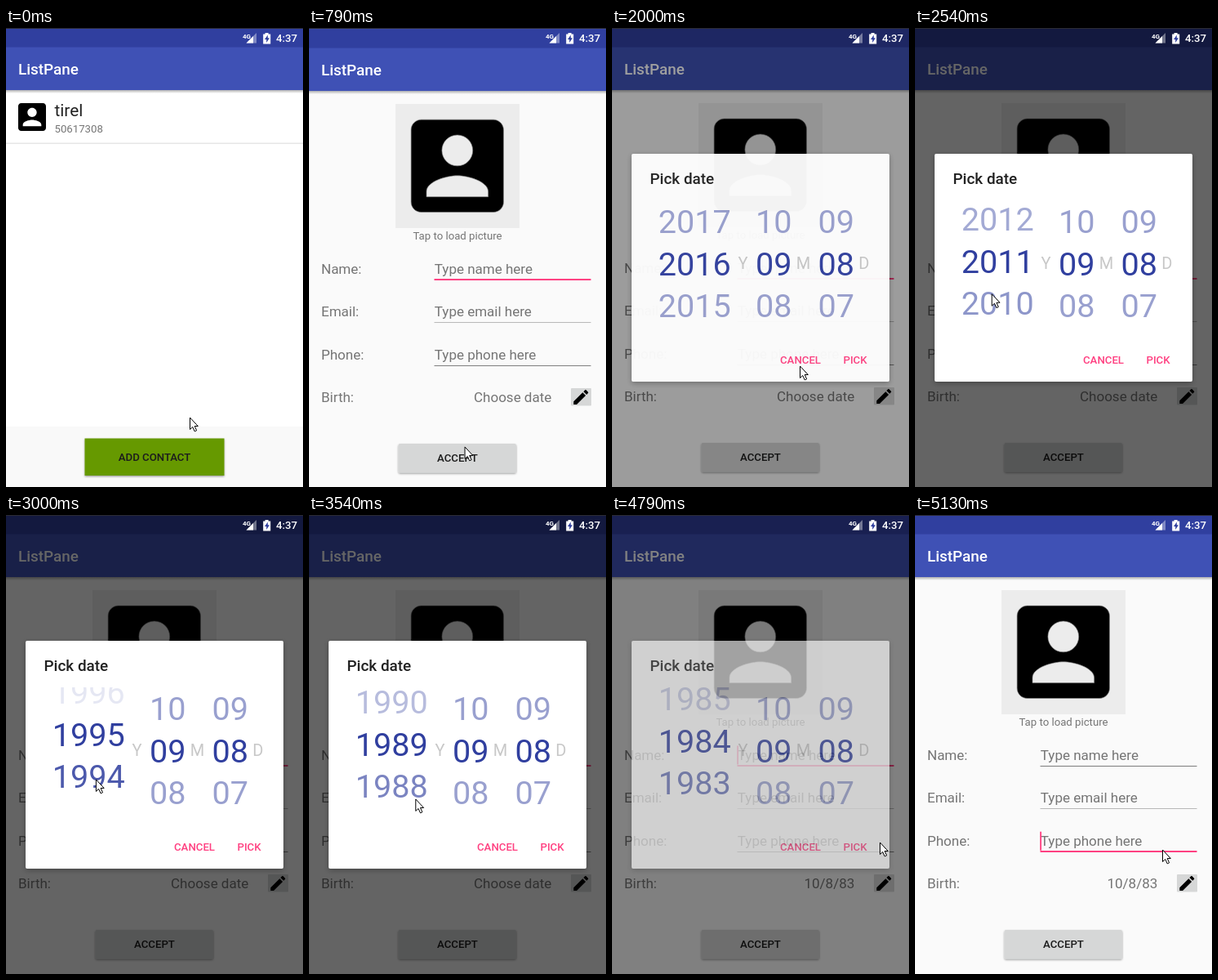
Write an HTML page that moves like this. It is 364x562 px and loops after 5180 ms.

```html
<!DOCTYPE html>
<html lang="en">
<head>
<meta charset="utf-8">
<title>Contact form</title>
<style>
  html, body { margin: 0; width: 100%; height: 100%; overflow: hidden; background: #fafafa; }
  svg { display: block; width: 100%; height: 100%; }
  text { font-family: Roboto, "Liberation Sans", sans-serif; font-size: 17px; fill: #757575; }
  .title { font-size: 18.9px; font-weight: 500; fill: #fff; }
  .small { font-size: 13.2px; }
  .btn { font-size: 13.2px; font-weight: 500; fill: #1c1c1c; }
  .pink { fill: #ff4081; }
  .wheel text { font-size: 39.6px; text-anchor: middle; fill: #303f9f; }
  .unit { font-size: 20px; fill: #c8c8c8; text-anchor: middle; }
</style>
</head>
<body>
<svg viewBox="0 0 364 562" xmlns="http://www.w3.org/2000/svg">
  <defs>
    <linearGradient id="shade" x2="0" y2="1">
      <stop offset="0" stop-opacity=".3"/>
      <stop offset="1" stop-opacity="0"/>
    </linearGradient>
    <filter id="lift" x="-10%" y="-30%" width="120%" height="170%">
      <feDropShadow dx="0" dy="1.2" stdDeviation="1" flood-opacity=".4"/>
    </filter>
    <filter id="float" x="-10%" y="-10%" width="120%" height="125%">
      <feDropShadow dx="0" dy="2" stdDeviation="3" flood-opacity=".3"/>
    </filter>
    <clipPath id="wheelClip"><rect x="40" y="211" width="290" height="156"/></clipPath>
    <clipPath id="addClip"><rect x="96.5" y="502.5" width="171" height="45.5"/></clipPath>
    <path id="person" fill-rule="evenodd" d="M3 5v14c0 1.1.89 2 2 2h14c1.1 0 2-.9 2-2V5c0-1.1-.9-2-2-2H5c-1.11 0-2 .9-2 2zm12 4c0 1.66-1.34 3-3 3s-3-1.34-3-3 1.34-3 3-3 3 1.34 3 3zm-9 8c0-2 4-3.1 6-3.1s6 1.1 6 3.1v1H6v-1z"/>
    <g id="bar">
      <rect width="364" height="24" fill="#303f9f"/>
      <rect y="76" width="364" height="4" fill="url(#shade)"/>
      <rect y="23.5" width="364" height="52.5" fill="#3f51b5"/>
      <text class="title" x="15" y="57">ListPane</text>
    </g>
  </defs>

  <g id="list">
    <rect width="364" height="562" fill="#fff"/>
    <rect y="488" width="364" height="74" fill="#f9f9f9"/>
    <use href="#bar"/>
    <use href="#person" transform="translate(9.3 86.3) scale(1.89)"/>
    <text x="59.5" y="108" style="font-size:20.8px;fill:#212121">tirel</text>
    <text class="small" x="59.5" y="128.3">50617308</text>
    <rect y="140.5" width="364" height="1.5" fill="#e6e6e6"/>
    <rect x="96.5" y="502.5" width="171" height="45.5" fill="#690" filter="url(#lift)"/>
    <circle id="ripple" cx="180" cy="518" opacity=".14" clip-path="url(#addClip)"/>
    <text class="btn" x="182" y="530.4" text-anchor="middle">ADD CONTACT</text>
  </g>

  <g id="form">
    <rect width="364" height="620" fill="#fafafa"/>
    <use href="#bar"/>
    <rect x="106" y="92" width="152" height="152" fill="#ececec"/>
    <use href="#person" transform="translate(106.2 92.2) scale(6.3)" stroke="#888" stroke-width=".1"/>
    <text class="small" x="182" y="257.8" text-anchor="middle">Tap to load picture</text>
    <g id="fields"></g>
    <text x="15" y="457">Birth:</text>
    <text id="birth" x="297.3" y="457" text-anchor="end"></text>
    <rect x="321" y="440" width="25" height="21.5" rx="1" fill="#d6d7d7"/>
    <path transform="translate(321.3 439)" d="M3 17.25V21h3.75L17.81 9.94l-3.75-3.75L3 17.25zM20.71 7.04c.39-.39.39-1.02 0-1.41l-2.34-2.34c-.39-.39-1.02-.39-1.41 0l-1.83 1.83 3.75 3.75 1.83-1.83z"/>
    <rect x="109.5" y="508" width="144.5" height="35.5" rx="2" fill="#d6d7d7" filter="url(#lift)"/>
    <text class="btn" x="182" y="530.4" text-anchor="middle">ACCEPT</text>
  </g>

  <rect id="dim" width="364" height="562"/>

  <g id="dialog">
    <rect x="24" y="154" width="316" height="279" rx="2" fill="#fff" filter="url(#float)"/>
    <text class="title" x="46.5" y="191" style="fill:#212121">Pick date</text>
    <g id="wheels" class="wheel" clip-path="url(#wheelClip)"></g>
    <text class="unit" x="160.5" y="295.2">Y</text>
    <text class="unit" x="234.5" y="295.2">M</text>
    <text class="unit" x="308.7" y="295.2">D</text>
    <text class="btn pink" x="231" y="411" text-anchor="middle">CANCEL</text>
    <text class="btn pink" x="298" y="411" text-anchor="middle">PICK</text>
  </g>

  <g fill="#fff">
    <text x="290" y="12.5" style="font-size:8px;font-weight:700;fill:#fff">4G</text>
    <path d="M307 6V18.5H294.5z" opacity=".4"/>
    <path d="M303 10V18.5H294.5z"/>
    <path d="M317.6 6h4v1.5h2.6v12h-9v-12h2.4z"/>
    <path d="M320.8 8.5l-3.8 5.6h2.2v3.8l3.7-5.6h-2.1z" fill="#303f9f"/>
    <text x="331" y="17" class="btn" style="fill:#fff">4:37</text>
  </g>
  <rect width="364" height="1" fill="#2b2b33"/>

  <path id="cursor" d="M.5 0V14.5L3.8 11.5 6.2 16.9 8.6 15.8 6.2 10.5H10.3z" fill="#fff" stroke="#000" stroke-linejoin="round"/>
</svg>

<script>
const LOOP = 5180, TICK = 1000 / 24;
const ROW = 51.5, MIDDLE = 289, PINK = '#ff4081';
const OPEN = 570, PICKED = 4740, REFOCUS = 5030;
const SWIPE = { from: 2154, to: 4000, count: 4, reach: 96 };
const $ = id => document.getElementById(id);

function set(el, attrs) {
  for (const k in attrs) el.setAttribute(k, attrs[k]);
}
function add(parent, tag, attrs, text = '') {
  const el = document.createElementNS('http://www.w3.org/2000/svg', tag);
  set(el, attrs);
  el.textContent = text;
  return parent.appendChild(el);
}

const ramp = (t, from, to) => Math.max(0, Math.min(1, (t - from) / (to - from)));
function ease(t, from, to) {
  const u = ramp(t, from, to);
  return u * u * (3 - 2 * u);
}

// Pointer moves: start, end, destination x and y
const MOVES = [
  [42, 250, 180, 517],
  [650, 1540, 335, 457],
  [1790, 2000, 230, 414],
  [2000, SWIPE.from, 88, 348],
  [SWIPE.from, SWIPE.to, 138, 348],
  [4150, 4458, 343, 398],
  [4458, 4583, 328, 401],
  [4792, 5042, 303, 410]
];

function pointer(t) {
  let x = 225, y = 477;
  for (const [from, to, toX, toY] of MOVES) {
    const u = ease(t, from, to);
    x += (toX - x) * u;
    y += (toY - y) * u;
  }
  const turn = 2 * Math.PI * SWIPE.count * ramp(t, SWIPE.from, SWIPE.to);
  return `translate(${x} ${y - SWIPE.reach * (1 - Math.cos(turn)) / 2})`;
}

// Two flings turn the year wheel
const yearAt = t => 2016 - 21.39 * ease(t, 2330, 3000) - 10.84 * ease(t, 3130, 3920);

function place(el, y) {
  set(el, { y: y + 13.7, opacity: ramp(Math.min(y - 211, 367 - y), 0, 54) });
}

const fields = ['Name', 'Email', 'Phone'].map((label, i) => {
  const y = 299.5 + i * 52.6, g = $('fields');
  add(g, 'text', { x: 15, y }, label + ':');
  add(g, 'text', { x: 153.8, y }, `Type ${label.toLowerCase()} here`);
  return {
    y: Math.round(y + 7),
    rest: i === 1 ? '#b8b8b8' : '#7d7d7d',
    line: add(g, 'rect', { x: 153.5, width: 192 }),
    caret: add(g, 'rect', { x: 153.2, y: y - 17, width: 1.8, height: 23, fill: PINK })
  };
});

const years = Array.from({ length: 5 }, () => add($('wheels'), 'text', { x: 101.2 }));
for (const [x, value] of [[198.3, 9], [274.8, 8]]) {
  for (let d = -1; d <= 1; d++) {
    const el = add($('wheels'), 'text', { x }, String(value - d).padStart(2, '0'));
    place(el, MIDDLE + d * ROW);
  }
}

function drawYears(t) {
  const pos = yearAt(t), top = Math.round(pos) + 2;
  years.forEach((el, i) => {
    el.textContent = top - i;
    place(el, MIDDLE + (pos - top + i) * ROW);
  });
}

function drawFields(t) {
  const focus = t < REFOCUS ? 0 : 2;
  const blink = (t > 990 && t < 1450) || t > PICKED;
  fields.forEach((f, i) => {
    const on = i === focus;
    set(f.line, { y: f.y - on, height: 1 + on, fill: on ? PINK : f.rest });
    f.caret.setAttribute('opacity', on && blink ? 1 : 0);
  });
  $('birth').textContent = t < PICKED ? 'Choose date' : '10/8/83';
}

function draw(ms) {
  const t = Math.floor((ms + 10) / TICK) * TICK;
  const drop = 45 * (1 - ramp(t, OPEN, OPEN + 310)) ** 3;
  set($('cursor'), { transform: pointer(t) });
  set($('ripple'), { r: 110 * ramp(t, 417, 667) });
  set($('form'), { opacity: ramp(t, OPEN, OPEN + 220), transform: `translate(0 ${drop})` });
  set($('dim'), { opacity: .6 * (ease(t, 1875, 2088) - ease(t, 4710, 5007)) });
  set($('dialog'), { opacity: ease(t, 1800, 2030) - ease(t, 4710, 4910) });
  drawFields(t);
  drawYears(t);
}

const start = performance.now();
function loop() {
  draw((performance.now() - start) % LOOP);
  requestAnimationFrame(loop);
}
loop();
</script>
</body>
</html>
```
